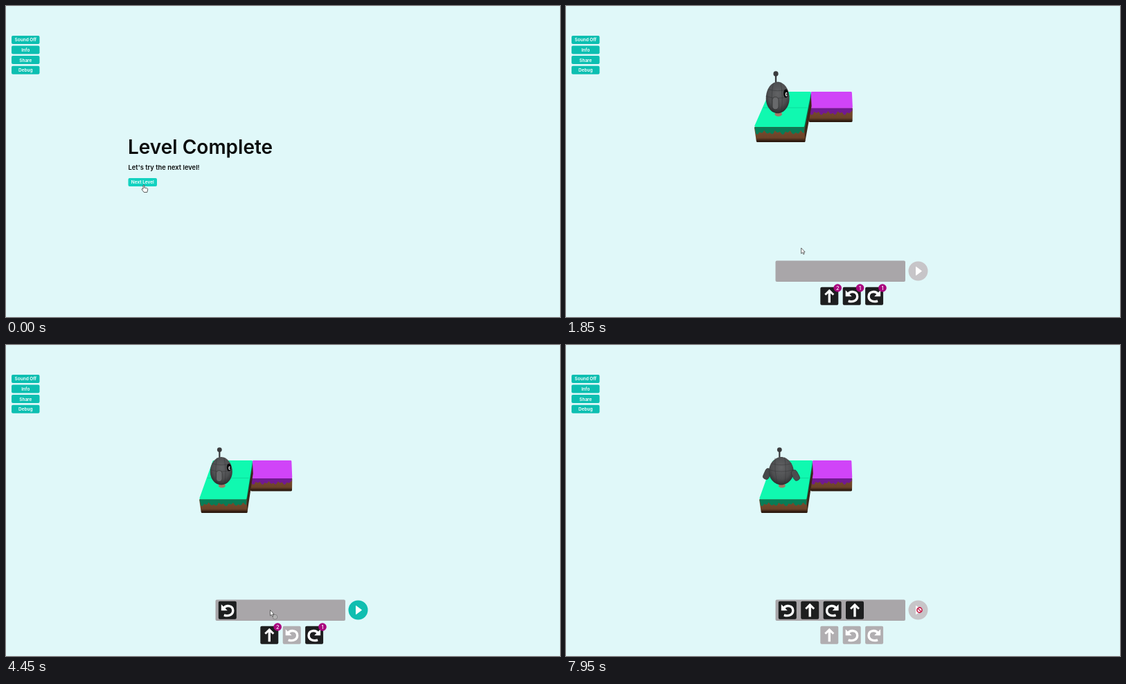
An HTML page that plays this animation: 800x450 px, repeating every 8 s.

```html
<!DOCTYPE html>
<html lang="en">
<head>
<meta charset="utf-8">
<title>Robot level</title>
<style>
html, body { margin: 0; width: 100%; height: 100%; overflow: hidden; background: #e0f8f9; }
svg { display: block; width: 100vw; height: 100vh; }
text { font-family: Inter, Montserrat, sans-serif; font-weight: 600; }
.label { font-size: 6.5px; fill: #fff; text-anchor: middle; }
.badge { font-size: 7.5px; font-weight: 500; fill: #fff; text-anchor: middle; }
.icon { fill: none; stroke: #fff; stroke-width: 3.4; }
</style>
</head>
<body>
<svg viewBox="0 0 800 450">
  <defs>
    <linearGradient id="dirt" x1="0" y1="0" x2="0" y2="1">
      <stop offset=".3" stop-color="#75492c"/>
      <stop offset=".75" stop-color="#6b4329"/>
      <stop offset="1" stop-color="#2c1a10"/>
    </linearGradient>
    <radialGradient id="metal" cx=".5" cy=".38" r=".62">
      <stop offset="0" stop-color="#626365"/>
      <stop offset=".65" stop-color="#4d4e50"/>
      <stop offset="1" stop-color="#2c2d2f"/>
    </radialGradient>
    <g id="up"><path class="icon" d="M0 9.5V-6"/><path d="M0-10L7-3L5-1L0-5.5L-5-1L-7-3Z" fill="#fff"/></g>
    <g id="left"><path class="icon" d="M-5-3.5C-1-8 8-7 8 .5C8 7 1 9-5 7"/><path d="M-9-8.5V.5H0Z" fill="#fff"/></g>
    <g id="right"><use href="#left" transform="scale(-1 1)"/></g>
    <path id="arrow" d="M0 0V8.2L1.9 6.5L3.2 9.3L4.6 8.6L3.3 6H5.6Z" fill="#fff" stroke="#444" stroke-width=".8"/>
    <g id="drag"><use href="#arrow"/><rect x="4.5" y="7.5" width="5" height="5" rx=".6" fill="#eee" stroke="#555" stroke-width=".8"/><path d="M7 8.8V11.2M5.8 10H8.2" stroke="#555" stroke-width=".7"/></g>
    <path id="hand" d="M0 .5Q1-.8 1.8 .5V4L5.6 4.6Q7 5 6.7 6.8L5.8 10.5H1.2L-1.8 6.6Q-2 5.2-.6 5.6L0 6Z" fill="#fff" stroke="#333" stroke-width=".8"/>
    <g id="blocked"><circle r="3.6" fill="#fff" stroke="#c51f4a" stroke-width="1.6"/><path d="M-2.5-2.5L2.5 2.5" stroke="#c51f4a" stroke-width="1.5"/></g>
  </defs>
  <g id="menu"></g>
  <g id="message">
    <text x="176" y="213.5" font-size="28" fill="#0b0d0d">Level Complete</text>
    <text x="176.5" y="237" font-size="9.4" fill="#0b0d0d">Let's try the next level!</text>
    <rect x="176.5" y="249" width="41.5" height="12" rx="2" fill="#12d2c0"/>
    <text class="label" x="197.3" y="257.3">Next Level</text>
  </g>
  <g id="world"></g>
  <g id="panel"></g>
  <use id="cursor"/>
</svg>
<script>
const LOOP = 8000, START = 50, WORLD_IN = 750, PLAY = 7250, TURN = 7300;
const el = id => document.getElementById(id);
const clamp = v => Math.max(0, Math.min(1, v));
const poly = points => 'M' + points.map(p => p.map(n => n.toFixed(2))).join('L');

// Column x, row (0 = far edge) and height to stage pixels.
function project(x, row, height) {
  const s = 1 / (1 - row / 12 - height * 0.00125);
  return [400 + s * x, 225 + s * (28.2 * row - 58 - height)];
}

function bounceOut(x) {
  const k = 7.5625, d = 2.75;
  if (x < 1 / d) return k * x * x;
  if (x < 2 / d) return k * (x - 1.5 / d) ** 2 + 0.75;
  if (x < 2.5 / d) return k * (x - 2.25 / d) ** 2 + 0.9375;
  return k * (x - 2.625 / d) ** 2 + 0.984375;
}

function face(points, fill, round = 3) {
  return `<path d="${poly(points)}Z" fill="${fill}" stroke="${fill}" stroke-width="${round}" stroke-linejoin="round"/>`;
}

function block(x0, x1, rows, h, top, rim) {
  const a = x0 + 1.4, b = x1 - 1.2, low = h - 15.7, high = h - 1;
  const at = (x, row, y) => project(x, row, y);
  const drips = [];
  for (let x = b; x >= a; x -= 1)
    drips.push(at(x, rows, h - 5.3 - 2.4 * Math.sin(x * 0.75) * Math.sin(x * 0.31 + 1)));
  const side = b < 0 ? face([at(b, 0.1, high), at(b, rows, high), at(b, rows, low), at(b, 0.1, low)], '#3d2617')
    + face([at(b, 0.1, high), at(b, rows, high), at(b, rows, h - 5), at(b, 0.1, h - 5)], rim, 2) : '';
  return side
    + face([at(a, rows, high), at(b, rows, high), at(b, rows, low), at(a, rows, low)], 'url(#dirt)')
    + face([at(a, rows, high), at(b, rows, high), ...drips], rim, 2)
    + face([at(a, 0.06, h), at(b, 0.06, h), at(b, rows - 0.04, h), at(a, rows - 0.04, h)], top);
}

function robot(h, turn) {
  const s = Math.sin(turn), c = Math.cos(turn);
  const [x, y] = project(-75.5, 1.5, h + 15), base = project(-75.5, 1.5, h)[1];
  const [x0, y0] = project(-75.5, 1.5, 15), base0 = project(-75.5, 1.5, 0)[1];
  const tall = (base - project(0, 1.5, h + 48)[1]) / (base0 - project(0, 1.5, 48)[1]);
  const wide = (400 - x) / (400 - x0);
  const arm = (ax, ay, tilt, fill) =>
    `<rect x="-4.3" y="-8" width="8.6" height="16" rx="4" fill="${fill}" stroke="#333" stroke-width=".7" transform="translate(${ax} ${ay}) rotate(${tilt})"/>`;
  const gaze = 0.77 - turn, rx = 16 + 2 * s;
  const eye = gaze > 0 ? `<g transform="translate(${15.5 * Math.cos(gaze)} -29.5)">
    <ellipse rx="${4.6 * Math.sin(gaze)}" ry="5.4" fill="#08090a"/>
    <ellipse cx=".8" cy="1" rx="${2 * Math.sin(gaze)}" ry="2.6" fill="#fff"/>
    <ellipse cx="1.3" cy="1" rx="${1.1 * Math.sin(gaze)}" ry="1.5" fill="#111"/></g>` : '';
  return `<g transform="translate(${x - 1} ${base - 0.5}) scale(${wide} ${tall})">
    <ellipse cx="1" cy="-3" rx="5" ry="3" fill="#a37866"/>
    ${turn > 0.1 ? arm(-20.5 * s, -20, 24 * s, '#47484a') : ''}
    <path d="M-2.5-43V-54" stroke="#3a3b3d" stroke-width="2.2"/>
    <circle cx="-2.5" cy="-55" r="3.4" fill="#3b3c3e"/>
    <path d="M${-rx}-23C${-rx}-36-8-44.5 0-44.5S${rx}-36 ${rx}-23C${rx}-13 9-4 0-4S${-rx}-13 ${-rx}-23Z" fill="url(#metal)"/>
    <path d="M${-rx}-26Q0-21 ${rx}-26M${-rx + 3}-35Q0-31 ${rx - 3}-35M${-6 - 3 * s}-43Q-10-25-6-6M${4 + s}-44Q8-25 5-6" fill="none" stroke="#303133" stroke-width=".6" opacity=".7"/>
    ${eye}${arm(21 * s - 3 * c, -17 - s, -28 * s, s > 0.6 ? '#4c4d4f' : '#68696b')}</g>`;
}

function world(t) {
  const h = 220 * (1 - bounceOut(clamp((t - START) / 2784)));
  const turn = clamp((t - TURN) / 700) * Math.PI / 2;
  const seam = poly([project(-100, 1, h), project(-45, 1, h)]);
  return block(-44, 12, 1, h, '#d044f8', '#711a92')
    + block(-101, -44, 2, h, '#10f9b0', '#087c56')
    + `<path d="${seam}" stroke="#08bd86" stroke-width=".8" opacity=".6"/>`
    + robot(h, turn);
}

const kinds = ['up', 'left', 'right'];
const drops = [[3850, 'left'], [4600, 'up'], [5250, 'right'], [6350, 'up']];
const stock = { up: 2, left: 1, right: 1 };

function tile(kind, x, y, fill) {
  return `<rect x="${x - 13}" y="${y - 13}" width="26" height="26" rx="2" fill="${fill}"/><use href="#${kind}" x="${x}" y="${y}"/>`;
}
function badge(x, y, label, fill) {
  return `<circle cx="${x}" cy="${y}" r="5.8" fill="${fill}"/><text class="badge" x="${x}" y="${y + 2.7}">${label}</text>`;
}

function panel(t) {
  const placed = drops.filter(d => t >= d[0]);
  const ready = placed.length && t < PLAY;
  let out = '<rect x="302.5" y="368.5" width="187.5" height="30.5" rx="2" fill="#a9a6a9"/>'
    + `<circle cx="508.5" cy="383.5" r="14" fill="${ready ? '#10beb0' : '#c7c5c8'}"/>`
    + '<path d="M505.5 377.5V389.5L513.5 383.5Z" fill="#fff" stroke="#fff" stroke-linejoin="round"/>';
  placed.forEach(([, kind], i) => out += tile(kind, 319.8 + 32.4 * i, 383.8, '#1d1e1f'));
  kinds.forEach((kind, i) => {
    const x = 380.3 + 32.4 * i;
    const left = stock[kind] - placed.filter(d => d[1] === kind).length;
    out += tile(kind, x, 419.8, left ? '#1d1e1f' : '#b1aeb1');
    if (left) out += badge(x + 11.9, 408, left, '#a9047f');
  });
  if (t >= 6350 && t < 6600) out += badge(428.7, 372, 'x', '#b3163f');
  return out;
}

// Time, x, y of the pointer tip.
const path = [
  [50, 198, 259], [350, 225, 285], [750, 240, 300], [1350, 295.5, 337.5],
  [1850, 339.5, 350], [2550, 429, 384], [3000, 412, 420], [3400, 412, 420],
  [3850, 372, 386], [4050, 378, 392], [4250, 380, 420], [4450, 381.5, 383.5],
  [4600, 384, 384], [4900, 445, 420], [5000, 445, 420], [5250, 430, 386],
  [5650, 430, 386], [5950, 380, 420], [6050, 380, 420], [6350, 440, 383],
  [6550, 448.5, 382], [7100, 510.5, 383.5]
];
const pointers = [
  [0, 'hand'], [100, 'arrow'], [3200, 'drag'], [3850, 'arrow'], [4250, 'drag'], [4600, 'arrow'],
  [4950, 'drag'], [5250, 'arrow'], [6000, 'drag'], [6350, 'arrow'], [7000, 'hand'], [PLAY, 'blocked']
];

function pointerAt(t) {
  const i = path.findIndex(p => p[0] > t);
  if (i === 0) return path[0].slice(1);
  if (i < 0) return path[path.length - 1].slice(1);
  const [t0, x0, y0] = path[i - 1], [t1, x1, y1] = path[i];
  const f = (t - t0) / (t1 - t0);
  return [x0 + (x1 - x0) * f, y0 + (y1 - y0) * f];
}

el('menu').innerHTML = ['Sound Off', 'Info', 'Share', 'Debug'].map((name, i) => {
  const y = 43 + 14.55 * i;
  return `<rect x="8" y="${y}" width="40.5" height="12" rx="2" fill="#0cbfb1"/><text class="label" x="28.3" y="${y + 8.4}">${name}</text>`;
}).join('');

function render(now) {
  const t = now % LOOP, playing = t >= START;
  el('message').style.display = playing ? 'none' : '';
  el('panel').innerHTML = playing ? panel(t) : '';
  el('world').innerHTML = t >= WORLD_IN ? world(t) : '';
  const [x, y] = pointerAt(t), cursor = el('cursor');
  cursor.setAttribute('href', '#' + pointers.filter(p => t >= p[0]).pop()[1]);
  cursor.setAttribute('transform', `translate(${x} ${y})`);
}

const begin = performance.now();
function tick() {
  render(performance.now() - begin);
  requestAnimationFrame(tick);
}
tick();
</script>
</body>
</html>
```
